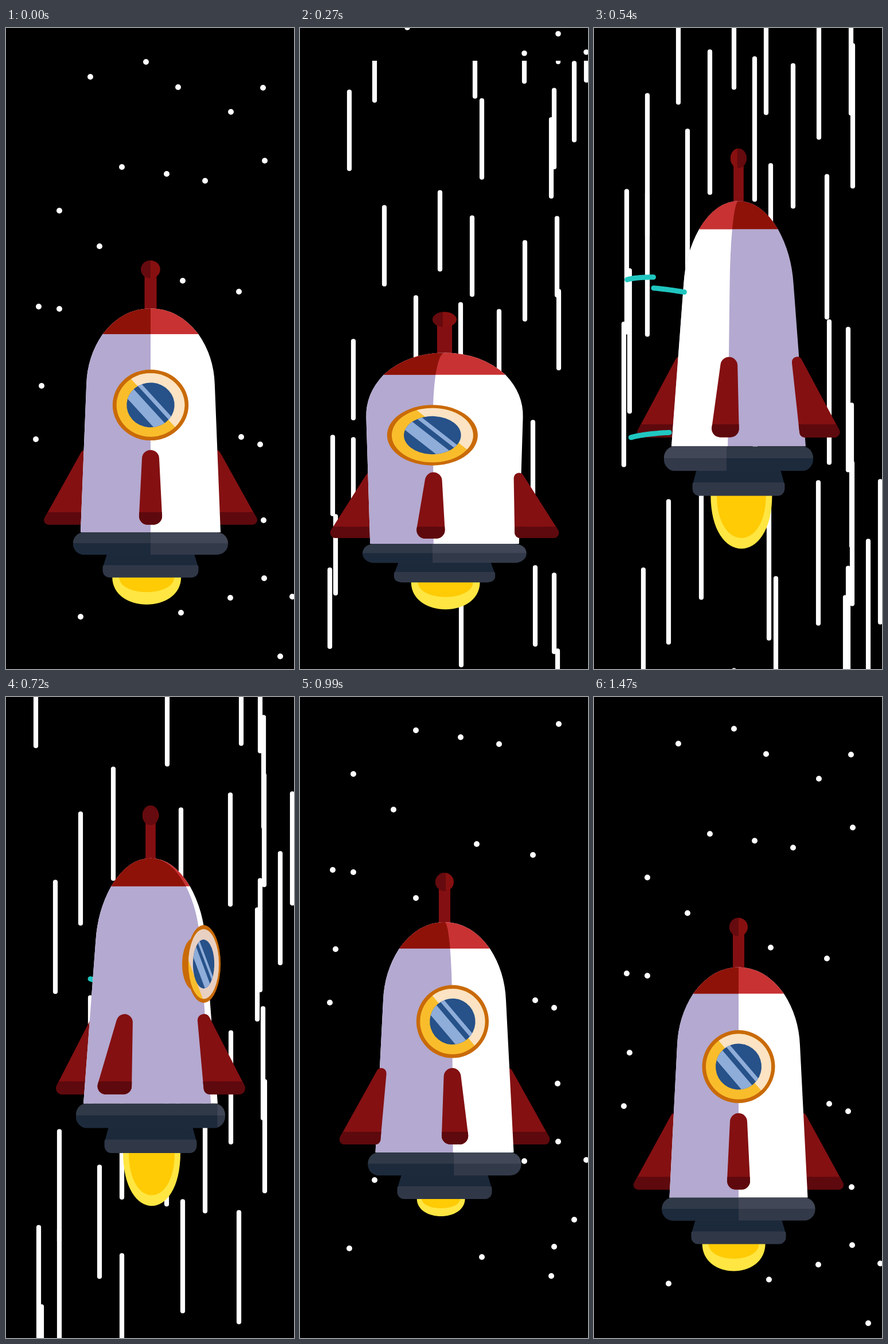
An HTML page with a canvas for the animation above (1.53 s loop, 502x1116 px).

```html
<!DOCTYPE html>
<html>
<head>
<meta charset="utf-8">
<title>Rocket</title>
<style>
  html, body { margin: 0; height: 100%; overflow: hidden; background: #000; }
  canvas { display: block; }
</style>
</head>
<body>
<canvas id="stage" width="502" height="1116"></canvas>
<script>
const ctx = document.getElementById('stage').getContext('2d');
const STEP = 30, PERIOD = 51, TILE = 1260, CX = 252;

// Resting places in one repeating tile
const stars = [
  [244, 59], [147, 85], [300, 103], [448, 104], [392, 146], [451, 231], [202, 242],
  [280, 254], [347, 266], [93, 318], [163, 380], [308, 440], [406, 459], [57, 485],
  [93, 489], [202, 534], [62, 623], [410, 712], [52, 716], [443, 725], [281, 748],
  [449, 857], [187, 947], [450, 958], [499, 990], [391, 992], [305, 1018], [130, 1025],
  [478, 1094], [443, 1141], [86, 1144], [317, 1159], [438, 1192]
];

function ease(t, from, to) {
  const u = Math.max(0, Math.min(1, (t - from) / (to - from)));
  return u * u * (3 - 2 * u);
}

// Smooth monotone curve through [time, value] points
function curve(t, ...keys) {
  const slope = i => keys[i] && keys[i + 1]
    ? (keys[i + 1][1] - keys[i][1]) / (keys[i + 1][0] - keys[i][0]) : 0;
  const tangent = i => {
    const a = slope(i - 1), b = slope(i);
    return a * b > 0 ? 2 * a * b / (a + b) : a || b ? (i === 0 ? b : 0) : 0;
  };
  let i = keys.length - 2;
  while (keys[i][0] > t) i--;
  const [t0, a] = keys[i], [t1, b] = keys[i + 1];
  const h = t1 - t0, u = (t - t0) / h, w = 1 - u;
  return a * (1 + 2 * u) * w * w + b * (3 - 2 * u) * u * u
    + h * u * w * (tangent(i) * w - tangent(i + 1) * u);
}

function poseAt(t) {
  const rush = Math.max(0, Math.min(1, (t - 4.3) / 28));
  const settle = ease(t, 24, 33), thrust = ease(t, 9, 13) - settle;
  const trail = 245 * Math.sin(Math.PI * rush ** .95);
  return {
    t, thrust, trail,
    seam: trail > 1 ? Math.max(0, 140.25 - 9.25 * t) : 0,
    lead: curve(t, [0, 0], [9, 361], [13, 745], [24, 1889], [33, 2336], [41, 2456], [PERIOD, 2 * TILE]),
    base: curve(t, [0, 878], [9, 898], [13, 801], [22, 702], [33, 793], [41, 848], [PERIOD, 873]),
    spin: curve(t, [0, 0], [9, -8.5], [13, -80], [24, -296], [33, -353], [41, -360], [PERIOD, -360]),
    stretch: .972 - .143 * ease(t, 0, 9) + .236 * ease(t, 9, 13.5) - .065 * settle,
    flameX: 249 + 8 * Math.sin((t - 4) * 2 * Math.PI / PERIOD),
    flameW: 60 - 10 * ease(t, 9, 24) - 8 * settle + 13 * ease(t, 33, 49),
    flameH: 48 + 45 * thrust - 17 * (settle - ease(t, 41, 49))
  };
}

function fill(color) { ctx.fillStyle = color; ctx.fill(); }

function box(color, ...rect) { ctx.fillStyle = color; ctx.fillRect(...rect); }

function disc(x, y, r, color) {
  ctx.beginPath();
  ctx.arc(x, y, r, 0, 7);
  fill(color);
}

function scoped(draw) { ctx.save(); draw(); ctx.restore(); }

function clipRect(...rect) {
  ctx.beginPath();
  ctx.rect(...rect);
  ctx.clip();
}

function line(x, y1, y2) {
  ctx.beginPath();
  ctx.moveTo(x, y1);
  ctx.lineTo(x, y2 + .01);
  ctx.stroke();
}

function drawStars({ lead, trail, seam }) {
  ctx.strokeStyle = '#fff';
  ctx.lineCap = 'round';
  ctx.lineWidth = trail > 1 ? 8.2 : 10;
  scoped(() => {
    clipRect(0, seam || -9, 502, 1130);
    for (const [x, rest] of stars) {
      const y = (rest + lead) % TILE;
      for (const end of [y - TILE, y, y + TILE]) line(x, end - trail, end);
    }
  });
  // Above the seam the next tile still shows plain dots
  for (const [x, rest] of stars) {
    const y = (rest + lead) % TILE - seam + 8;
    if (y < seam) disc(x, y, 4.8, '#fff');
  }
}

function drawWinds({ t, base }, front) {
  if (t < 10 || t > 24) return;
  const turn = (t - 13) * .354, size = Math.min(1, (t - 9) / 4, (25 - t) / 12);
  ctx.strokeStyle = '#20c6c0';
  ctx.lineWidth = 9;
  ctx.lineCap = ctx.lineJoin = 'round';
  ctx.beginPath();
  for (const [end, length, y, tilt] of [[.96, .75, -250, 32], [1.29, .56, -218, 50], [1.14, .9, 8, 12]]) {
    let drawing = false;
    for (let i = 0; i <= 24; i++) {
      const a = end - length * size * i / 24 - turn, s = Math.sin(a), c = Math.cos(a);
      if (c > 0 !== front) { drawing = false; continue; }
      ctx[drawing ? 'lineTo' : 'moveTo'](CX + 205 * s, base + y + tilt * s - 31 * c);
      drawing = true;
    }
  }
  ctx.stroke();
}

function drawFlame(x, y, halfWidth, height, color) {
  const low = y + height * 4 / 3;
  ctx.beginPath();
  ctx.moveTo(x - halfWidth, y);
  ctx.bezierCurveTo(x - halfWidth, low, x + halfWidth, low, x + halfWidth, y);
  fill(color);
}

function drawRocket(p) {
  const squash = 1 - p.stretch;
  const rad = p.spin * Math.PI / 180, sin = Math.sin(rad), cos = Math.cos(rad);
  const sideways = Math.abs(sin) > .5;
  // Edge between the shaded and the lit half, and which of them is on the left
  const edge = cos > 0 ? sin : -sin;
  const pair = (shade, lit) => cos > 0 ? [shade, lit] : [lit, shade];

  const local = (widen, draw) => scoped(() => {
    ctx.transform(1 + squash * widen, 0, 0, p.stretch, CX, p.base);
    draw();
  });
  // The hull bulges more towards the top
  const at = (x, up) => [CX + x * (1 + squash * (.45 + .0044 * up)), p.base - up * p.stretch];

  function hull(m1, m2, color) {
    const q = (...pts) => ctx.quadraticCurveTo(...pts.flatMap(pt => at(...pt)));
    ctx.beginPath();
    ctx.moveTo(...at(120.5 * m1, 0));
    ctx.lineTo(...at(107 * m1, 265));
    q([105 * m1, 315], [79 * m1, 355]);
    q([46 * m1, 401], [0, 401]);
    q([46 * m2, 401], [79 * m2, 355]);
    q([105 * m2, 315], [107 * m2, 265]);
    ctx.lineTo(...at(120.5 * m2, 0));
    fill(color);
  }

  function splitHull(shade, lit) {
    const [left, right] = pair(shade, lit);
    hull(-1, 1, right);
    hull(-1, edge, left);
  }

  function fin(angle) {
    const s = Math.sin(angle), c = Math.abs(Math.cos(angle)), w = 8 + 7 * c;
    const spread = 5 * c * (s < 0 ? -1 : 1);
    const shape = color => {
      ctx.beginPath();
      ctx.moveTo(...at(111 * s, 147 - w));
      ctx.lineTo(...at(175 * s + spread, 14 + w));
      ctx.lineTo(...at(122 * s - spread, 14 + w));
      ctx.closePath();
      ctx.lineWidth = 2 * w;
      ctx.lineJoin = 'round';
      ctx.strokeStyle = color;
      ctx.stroke();
      fill(color);
    };
    scoped(() => {
      shape('#841012');
      clipRect(0, p.base - 36 * p.stretch, 502, 40);
      shape('#5e090d');
    });
  }

  function fins(front) {
    for (let i = 0; i < 4; i++) {
      const angle = rad + i * Math.PI / 2;
      if (Math.cos(angle) > .01 === front) fin(angle);
    }
  }

  function porthole() {
    const tilt = .14 + .86 * Math.abs(cos);
    const cream = sideways ? '#e8d0c2' : '#fbe3c4';
    local(1.5, () => {
      ctx.translate(0, -228);
      if (sideways) {
        scoped(() => {
          ctx.translate(92 * sin, 0);
          ctx.scale(tilt, 1);
          disc(0, 0, 42, sin > 0 ? '#c96a08' : cream);
        });
      }
      ctx.translate(114 * sin, 0);
      ctx.scale(tilt, 1);
      disc(0, 0, 63.5, '#c96a08');
      disc(0, 0, 57, '#f9bd2c');
      ctx.clip();
      ctx.rotate(.864);
      box(cream, -90, -90, 180, 87 + 45 * sin * sin - 90 * squash);
      disc(0, 0, 40, '#265189');
      ctx.clip();
      box('#8fadd9', -60, 3, 120, 19);
      box('#8fadd9', -60, -13, 120, 7);
    });
  }

  const nozzle = p.base + 80 * p.stretch;
  drawFlame(p.flameX, nozzle, p.flameW, p.flameH, '#ffe642');
  drawFlame(p.flameX, nozzle, p.flameW * .8, p.flameH * (.55 + .25 * p.thrust), '#ffcb05');

  fins(false);
  local(1.8, () => {
    const [left, right] = pair('#650a0e', '#86100f');
    box('#840f12', -10, -471, 20, 80);
    disc(0, -471, 16, right);
    ctx.clip();
    box(left, -16, -490, 16 + 16 * edge, 40);
  });
  if (cos <= 0 && cos > -.2) porthole();
  splitHull('#b4a9d0', '#fff');
  scoped(() => {
    clipRect(0, 0, 502, p.base - 355 * p.stretch);
    splitHull('#8e1208', '#c83233');
  });
  if (cos > 0) porthole();
  fins(true);

  local(.4, () => {
    ctx.beginPath();
    ctx.moveTo(-75, 38);
    ctx.lineTo(75, 38);
    ctx.lineTo(82, 62);
    ctx.lineTo(-82, 62);
    fill('#1c293b');
    ctx.beginPath();
    ctx.roundRect(-82.5, 59, 165, 22, [3, 3, 12, 12]);
    fill('#303848');

    ctx.beginPath();
    ctx.roundRect(-133.5, 0, 267, 40, 19);
    ctx.clip();
    const band = (y, shade, lit) => {
      const [left, right] = pair(shade, lit);
      box(right, -134, y, 268, 21);
      box(left, -134, y, 134 + 133 * edge, 21);
    };
    band(0, '#303947', '#414756');
    band(19.5, '#1c2a3c', '#323949');
  });
}

function render() {
  const t = Math.min(49, Math.floor(performance.now() / STEP % PERIOD));
  const pose = poseAt(t);
  box('#000', 0, 0, 502, 1116);
  drawStars(pose);
  drawWinds(pose, false);
  drawRocket(pose);
  drawWinds(pose, true);
  requestAnimationFrame(render);
}
render();
</script>
</body>
</html>
```
